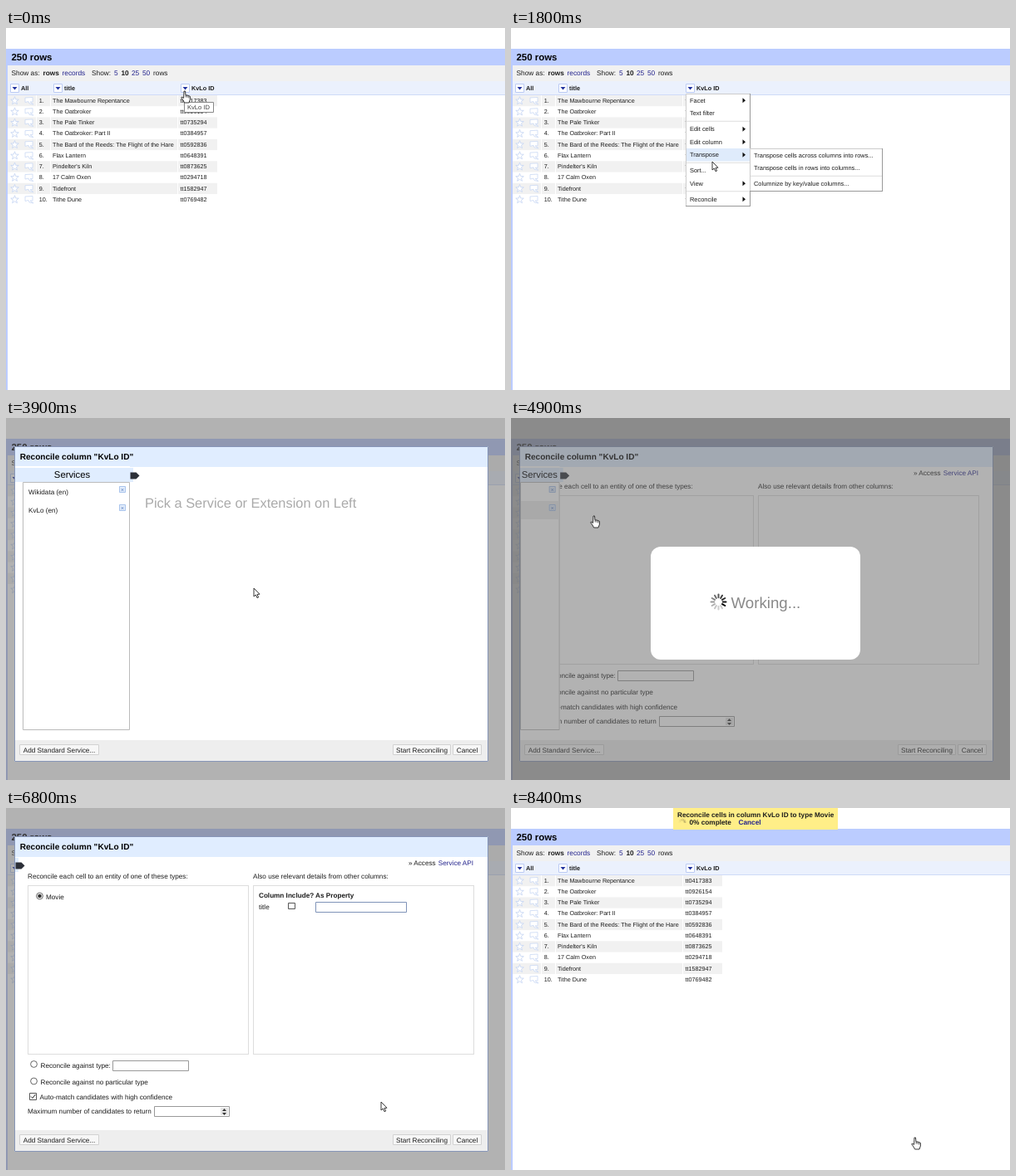
Write an HTML page with a canvas that moves like this. It is 600 px wide and 436 px high and loops after 8600 ms.

```html
<!DOCTYPE html>
<html lang="en">
<head>
<meta charset="utf-8">
<title>Reconcile a column</title>
<style>
html, body { margin: 0; width: 100%; height: 100%; overflow: hidden; background: #fff; }
canvas { display: block; width: 600px; height: 436px; }
</style>
</head>
<body>
<canvas id="stage" width="600" height="436"></canvas>
<script>
const ctx = document.getElementById("stage").getContext("2d");
const LOOP = 8600, STEP = 100;
const MENU_OPEN = 400, DIALOG_OPEN = 3200, SERVICE_PICKED = 4600, LOADED = 5400,
      DIALOG_CLOSED = 7500, NOTICE_SHOWN = 7700;
const LINK = "#22228c", PALE = "#e0edff";

const rows = [
  ["The Mawbourne Repentance", "tt0417383"],
  ["The Oatbroker", "tt0926154"],
  ["The Pale Tinker", "tt0735294"],
  ["The Oatbroker: Part II", "tt0384957"],
  ["The Bard of the Reeds: The Flight of the Hare", "tt0592836"],
  ["Flax Lantern", "tt0648391"],
  ["Pindelter's Kiln", "tt0873625"],
  ["17 Calm Oxen", "tt0294718"],
  ["Tidefront", "tt1582947"],
  ["Tithe Dune", "tt0769482"]
];

// A null entry is a separator; a trailing ">" marks a nested menu.
const mainMenu = ["Facet>", "Text filter", null, "Edit cells>", "Edit column>", "Transpose>",
  null, "Sort...", "View>", null, "Reconcile>"];
const transposeMenu = ["Transpose cells across columns into rows...",
  "Transpose cells in rows into columns...", null, "Columnize by key/value columns..."];
const reconcileMenu = ["Start reconciling...", "Facets>", "Actions>", null,
  "Copy reconciliation data...", "Use values as identifiers", "Add entity identifiers column..."];

// time, x, y of the pointer tip
const pointerPath = [
  [0, 214, 76], [500, 214, 76], [900, 232, 100], [1300, 238, 135], [1700, 242, 161],
  [1900, 242, 161], [2400, 238, 206], [2700, 238, 206], [3000, 298, 205], [3900, 298, 205],
  [4500, 99, 118], [4900, 99, 118], [5500, 103, 120], [5700, 103, 120], [6300, 430, 121],
  [6800, 451, 354], [7200, 485, 397], [LOOP, 485, 397]
];

const ease = p => p * p * (3 - 2 * p);
const clamp01 = p => Math.max(0, Math.min(1, p));

function pointerAt(t) {
  const i = pointerPath.findIndex(key => key[0] > t);
  const [t0, x0, y0] = pointerPath[i - 1], [t1, x1, y1] = pointerPath[i];
  const p = ease((t - t0) / (t1 - t0));
  return { x: x0 + (x1 - x0) * p, y: y0 + (y1 - y0) * p };
}

function fill(x, y, w, h, color) {
  ctx.fillStyle = color;
  ctx.fillRect(x, y, w, h);
}

function outline(x, y, w, h, color, background) {
  if (background) fill(x, y, w, h, background);
  ctx.strokeStyle = color;
  ctx.lineWidth = 1;
  ctx.strokeRect(x + .5, y + .5, w - 1, h - 1);
}

function text(string, x, y, size, { color = "#1c1c1c", bold = false, align = "left" } = {}) {
  ctx.font = `${bold ? "bold " : ""}${size}px "Liberation Sans", Arial, sans-serif`;
  ctx.textAlign = align;
  ctx.fillStyle = color;
  ctx.fillText(string, x, y);
}

function shape(points, fillColor, strokeColor, x = 0, y = 0, width = 1) {
  ctx.beginPath();
  points.forEach(([px, py]) => ctx.lineTo(x + px, y + py));
  ctx.closePath();
  if (fillColor) { ctx.fillStyle = fillColor; ctx.fill(); }
  if (strokeColor) {
    ctx.strokeStyle = strokeColor;
    ctx.lineWidth = width;
    ctx.lineJoin = "round";
    ctx.stroke();
  }
}

function spinner(x, y, inner, outer, width, t, shade) {
  const lead = Math.floor(t / 100) % 12;
  ctx.lineWidth = width;
  ctx.lineCap = "round";
  for (let i = 0; i < 12; i++) {
    const angle = i * Math.PI / 6;
    ctx.strokeStyle = shade(((lead - i) % 12 + 12) % 12);
    ctx.beginPath();
    ctx.moveTo(x + inner * Math.cos(angle), y + inner * Math.sin(angle));
    ctx.lineTo(x + outer * Math.cos(angle), y + outer * Math.sin(angle));
    ctx.stroke();
  }
  ctx.lineCap = "butt";
}

function columnHead(x, label) {
  outline(x, 67, 11, 11, "#bccbf3", "#fff");
  shape([[2.5, 4], [8.5, 4], [5.5, 7.5]], "#2233a0", null, x, 67);
  text(label, x + 13, 75.2, 7.3, { bold: true });
}

function star(x, y) {
  const points = Array.from({ length: 10 }, (_, i) => {
    const angle = i * Math.PI / 5 - Math.PI / 2, r = i % 2 ? 2.1 : 5;
    return [r * Math.cos(angle), r * Math.sin(angle)];
  });
  shape(points, "#fff", "#c3d4f3", x, y, .8);
}

function drawPage() {
  fill(0, 0, 600, 436, "#fff");
  fill(0, 25, 600, 20, "#bbccff");
  fill(0, 25, 2, 411, "#bbccff");
  text("250 rows", 6.5, 38.8, 11.45, { bold: true, color: "#000" });

  fill(2, 45, 598, 19, "#f1f1f1");
  [["Show as:", 6.5], ["rows", 44.5, 1], ["records", 67.5, 0, 1], ["Show:", 103], ["5", 130, 0, 1],
   ["10", 138.5, 1], ["25", 151, 0, 1], ["50", 164, 0, 1], ["rows", 177]]
    .forEach(([label, x, bold, link]) =>
      text(label, x, 57, 8.3, { bold, color: link ? LINK : "#1c1c1c" }));

  fill(2, 64, 598, 17, "#ebf1fd");
  fill(2, 80, 598, 1, "#cfdbf8");
  columnHead(5, "All");
  columnHead(57, "title");
  columnHead(210, "KvLo ID");

  rows.forEach(([title, id], i) => {
    const top = 81 + i * 13.22, base = top + 8.8;
    if (i % 2 === 0) fill(2, top, 252, 13.22, "#f1f1f1");
    star(10.5, top + 6.7);
    shape([[23, 3], [32, 2.5], [32, 8], [29, 8], [33, 11], [28, 10], [27, 7.5], [23, 8.5]],
      "#fff", "#cad8f4", 0, top, .8);
    text(`${i + 1}.`, 39.7, base, 7.2);
    text(title, 56, base, 7.2);
    text(id, 209.5, base, 7.2);
  });
  [36, 53, 206].forEach(x => fill(x, 81, 1, 132, "#fff"));
}

function layoutMenu(entries, top) {
  let y = top + .5;
  return entries.map(entry => {
    const height = entry ? 15.5 : 3.5;
    y += height;
    return { entry, y: y - height / 2, bottom: y };
  });
}

function drawMenu(entries, x, top, width, hoverY) {
  const items = layoutMenu(entries, top);
  const height = Math.ceil(items.at(-1).bottom + 1 - top);
  const active = items.find(item => item.entry && Math.abs(hoverY - item.y) <= 8.5);
  outline(x, top, width, height, "#ccc", "#fff");
  fill(x + width - 1, top, 1, height, "#999");
  fill(x, top + height - 1, width, 1, "#999");
  for (const item of items) {
    if (!item.entry) {
      fill(x + 1, item.y - .5, width - 2, 1, "#ddd");
      continue;
    }
    if (item === active) fill(x + 1, item.y - 7.75, width - 2, 15.5, "#dfebfb");
    text(item.entry.replace(">", ""), x + 5, item.y + 2.6, 7.45);
    if (item.entry.endsWith(">"))
      shape([[-9.5, -3], [-6, 0], [-9.5, 3]], "#111", null, x + width, item.y);
  }
  return active && active.entry;
}

function drawMenus(pointer) {
  const active = drawMenu(mainMenu, 210, 79, 78, pointer.y);
  const hoverY = pointer.x > 288 ? pointer.y : -99;
  if (active === "Transpose>") drawMenu(transposeMenu, 287, 145, 160, hoverY);
  if (active === "Reconcile>") drawMenu(reconcileMenu, 287, 198, 126, hoverY);
}

function dim() {
  fill(0, 0, 600, 436, "rgba(102,102,102,.5)");
}

function button(label, x, width) {
  outline(x, 393, width, 13, "#d2d2d2", "#f7f7f7");
  text(label, x + width / 2, 402.6, 8.2, { align: "center" });
}

function field(x, y, width, color = "#999") {
  outline(x, y, width, 13, color, "#fff");
}

function radio(x, y, checked) {
  ctx.beginPath();
  ctx.arc(x, y, 3.9, 0, 7);
  ctx.fillStyle = "#fff";
  ctx.fill();
  ctx.strokeStyle = "#555";
  ctx.lineWidth = .9;
  ctx.stroke();
  if (!checked) return;
  ctx.beginPath();
  ctx.arc(x, y, 2.3, 0, 7);
  ctx.fillStyle = "#333";
  ctx.fill();
}

function drawOptions(t) {
  const size = 8.17;
  text("» Access", 484, 69, size);
  text("Service API", 562, 69, size, { color: LINK, align: "right" });
  text("Reconcile each cell to an entity of one of these types:", 26, 85, size);
  text("Also use relevant details from other columns:", 297, 85, size);
  ctx.setLineDash([1, 1]);
  outline(26, 93, 266, 204, "#bbb");
  outline(297, 93, 266, 204, "#bbb");
  ctx.setLineDash([]);

  if (t >= LOADED) {
    radio(40.5, 106, true);
    text("Movie", 48, 109.7, size);
    text("Column Include? As Property", 304, 107.8, size, { bold: true });
    text("title", 304, 121.5, size);
    outline(339, 114, 9, 8, "#555", "#fff");
    field(372, 113, 110, t >= 6200 ? "#7f93b8" : "#999");
  }

  radio(33.5, 308.5);
  text("Reconcile against type:", 41.5, 312.5, size);
  field(128, 304, 92);
  radio(33.5, 329);
  text("Reconcile against no particular type", 41.5, 332.8, size);
  outline(28, 343, 9, 9, "#555", "#fff");
  ctx.beginPath();
  ctx.moveTo(30, 347.5);
  ctx.lineTo(32, 349.5);
  ctx.lineTo(35.3, 345);
  ctx.strokeStyle = "#222";
  ctx.stroke();
  text("Auto-match candidates with high confidence", 40.5, 351.2, size);
  text("Maximum number of candidates to return", 26, 367.8, size);
  field(178, 359, 91);
  fill(258, 361, 9, 9, "#e6e6e6");
  shape([[260, 365], [262.5, 362], [265, 365]], "#333");
  shape([[260, 367], [262.5, 370], [265, 367]], "#333");
}

function drawServices(t) {
  const p = clamp01((t - SERVICE_PICKED) / 500);
  const swing = .5 - Math.cos(p * Math.PI) / 2;
  const edge = 148 - 138 * swing;
  const left = Math.max(11, 20 - 20 * swing);

  if (edge > 14) {
    ctx.save();
    ctx.beginPath();
    ctx.rect(11, 58, edge - 10, 330);
    ctx.clip();
    fill(11, 58, edge - 10, 319, "#fff");
    fill(11, 60, edge, 17, PALE);
    if (edge > 45) text("Services", (11 + edge) / 2, 72, 11.3, { align: "center", color: "#000" });
    outline(left, 77, edge - left + 1, 299, "#bbb", "#fff");
    if (t >= 4400) fill(left + 1, 100, edge - left - 1, 22, "#eee");
    ["Wikidata (en)", "KvLo (en)"].forEach((label, i) => {
      const y = 82 + i * 22;
      if (edge > 110) text(label, left + 7, y + 10.3, 8.15);
      outline(edge - 12, y, 8, 8, "#a9c4ec", "#e4eefc");
      text("×", edge - 8, y + 6.6, 7.5, { color: "#5a7fc0", align: "center" });
    });
    ctx.restore();
  }
  fill(edge + 1, 60, 4, 17, PALE);
  shape([[0, 0], [7, 0], [11, 4], [7, 8], [0, 8]], "#2c3038", null, edge + 1.5, 65.5);
}

function drawDialog(t) {
  outline(10, 34, 570, 380, "#8796b8", "#fff");
  fill(11, 35, 568, 24, PALE);
  text('Reconcile column "KvLo ID"', 16.7, 49.5, 10.07, { bold: true, color: "#000" });
  fill(11, 388, 568, 25, "#eee");
  button("Add Standard Service...", 16, 96);
  button("Start Reconciling", 465, 70);
  button("Cancel", 537, 35);

  if (t < SERVICE_PICKED)
    text("Pick a Service or Extension on Left", 167, 108, 16.4, { color: "#aaa" });
  else
    drawOptions(t);
  drawServices(t);
}

function drawWorking(t) {
  dim();
  ctx.beginPath();
  ctx.roundRect(168, 155, 252, 136, 12);
  ctx.fillStyle = "#fff";
  ctx.fill();
  spinner(249.5, 221.5, 5.2, 9, 2, t, age => {
    const v = Math.min(205, age * 22);
    return `rgb(${v},${v},${v})`;
  });
  text("Working...", 264.5, 229, 18.7, { color: "#888" });
}

function drawNotice(t) {
  fill(195, 0, 198, 26, "#ffee88");
  text("Reconcile cells in column KvLo ID to type Movie", 200, 10.6, 8.21, { bold: true });
  spinner(206, 17, 2.2, 4, 1, t, age => `rgba(120,110,70,${clamp01(.7 - age * .1)})`);
  text("0% complete", 214.5, 20.2, 8.25, { bold: true });
  text("Cancel", 273.5, 20.2, 8.25, { bold: true, color: LINK });
}

function drawTooltip() {
  outline(214, 89, 36, 13, "#888", "#fff");
  text("KvLo ID", 218, 98.3, 7.6, { color: "#444" });
}

function drawPointer({ x, y }, hand) {
  if (!hand) {
    shape([[0, 0], [0, 10], [2.3, 8], [4, 11.7], [5.6, 11], [4, 7.4], [7, 7.2]],
      "#fff", "#222", x, y, .9);
    return;
  }
  shape([[0, 0], [1.5, 0], [2, 5], [4, 5], [5.8, 5.6], [7.4, 6.4], [7.4, 10], [6, 14],
    [.6, 14], [-1, 11], [-3.2, 8], [-2.6, 7], [-.4, 8.4]], "#fff", "#222", x, y, .9);
  ctx.beginPath();
  [[2.2, 5], [4, 5.3], [5.8, 6]].forEach(([dx, dy]) => {
    ctx.moveTo(x + dx, y + dy);
    ctx.lineTo(x + dx, y + dy + 2.5);
  });
  ctx.lineWidth = .7;
  ctx.stroke();
}

function draw(t) {
  const pointer = pointerAt(t);
  const hand = t < 500 || (t >= 4400 && t < 5300) || t >= 7100;
  ctx.textRendering = "geometricPrecision";
  drawPage();
  if (t < MENU_OPEN) drawTooltip();
  else if (t < DIALOG_OPEN) drawMenus(pointer);
  else if (t < DIALOG_CLOSED) {
    dim();
    drawDialog(t);
    if (t >= SERVICE_PICKED + 100 && t < LOADED) drawWorking(t);
  }
  if (t >= NOTICE_SHOWN) drawNotice(t);
  drawPointer(pointer, hand);
}

function tick() {
  const t = performance.now() % LOOP;
  draw(Math.min(LOOP - 2 * STEP, Math.floor(t / STEP) * STEP));
  requestAnimationFrame(tick);
}
tick();
</script>
</body>
</html>
```
